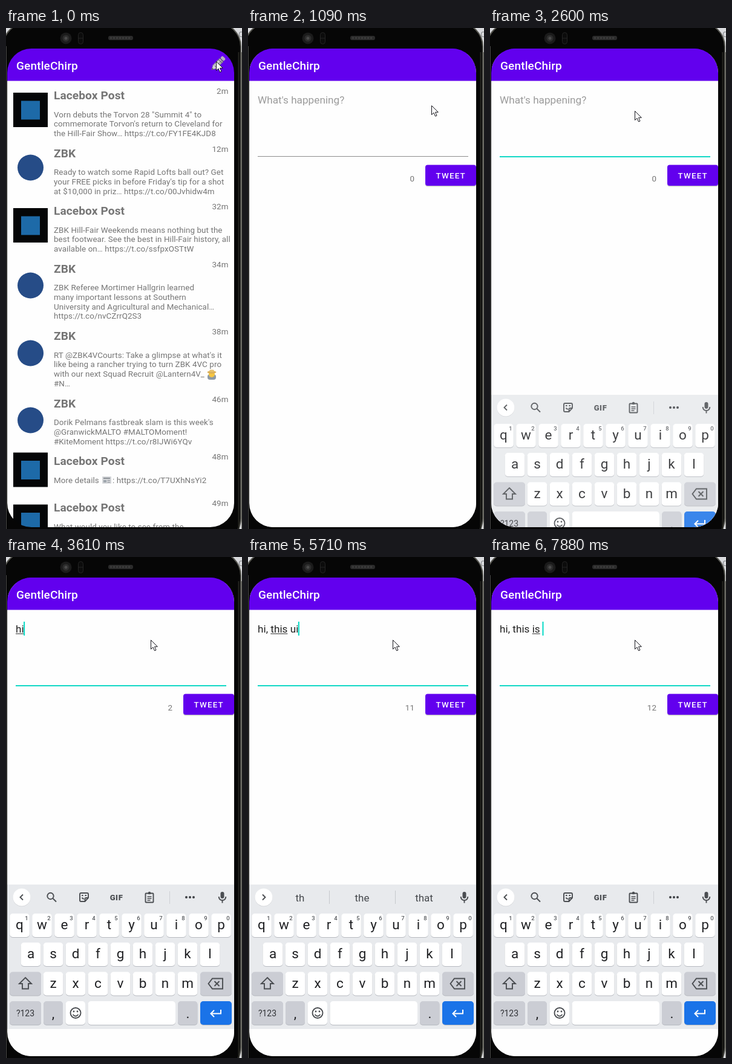
Recreate the animation shown at these times as an HTML page. Size 390 px wide and 829 px high, loop 8000 ms.

```html
<!DOCTYPE html>
<html lang="en">
<head>
<meta charset="utf-8">
<title>Phone post composer</title>
<style>
html, body { margin: 0; width: 100%; height: 100%; overflow: hidden; background: #000; }
svg { display: block; width: 390px; height: 829px; font-family: Roboto, Arial, sans-serif; }
text { white-space: pre; }
.mid { text-anchor: middle; }
.end { text-anchor: end; }
.title { font-size: 19.1px; font-weight: 500; fill: #fff; letter-spacing: .1px; }
.name { font-size: 19.1px; font-weight: 700; fill: #757575; letter-spacing: .1px; }
.body { font-size: 13.4px; fill: #757575; letter-spacing: .08px; }
.entry { font-size: 17.2px; }
.key { font-size: 22.5px; fill: #202124; text-anchor: middle; }
.hintnum { font-size: 9.5px; font-weight: 500; fill: #55585c; text-anchor: middle; }
.word { font-size: 17px; fill: #45484c; text-anchor: middle; }
.line { fill: none; stroke: #4b4e52; stroke-width: 1.9; }

#feed, #compose, #keys, #mouse, #focus { animation: 8s step-end infinite; }
#feed, #compose { transform-origin: 189.5px 430px; }
#feed { animation-name: feed; }
#compose { animation-name: compose; }
#keys { animation-name: keys; }
#mouse { animation-name: mouse; }
#focus { animation-name: focus; }
@keyframes feed {
  0% { transform: scale(1); }
  10% { transform: scale(1.006); }
  11.875%, 100% { transform: scale(1.13); }
}
@keyframes compose {
  0% { opacity: 0; transform: scale(.85); }
  11.875% { opacity: 1; transform: scale(.985); }
  13.625%, 100% { opacity: 1; transform: scale(1); }
}
@keyframes keys {
  0% { opacity: 0; transform: translateY(284px); }
  29.125% { opacity: .35; transform: translateY(225px); }
  30.75% { opacity: .65; transform: translateY(135px); }
  32.5% { opacity: .86; transform: translateY(65px); }
  34.875% { opacity: .97; transform: translateY(15px); }
  36.5%, 100% { opacity: 1; transform: translateY(0); }
}
@keyframes mouse {
  0% { transform: translate(347px, 55px); }
  8.5% { transform: translate(326px, 92px); }
  10% { transform: translate(300px, 129px); }
  11.875% { transform: translate(302px, 128px); }
  13.625% { transform: translate(303px, 128px); }
  15.25% { transform: translate(292px, 130px); }
  17.125% { transform: translate(268px, 134px); }
  18.75% { transform: translate(247px, 137px); }
  20.375%, 100% { transform: translate(239px, 137px); }
}
@keyframes focus {
  0% { opacity: 0; }
  21.875%, 100% { opacity: 1; }
}
</style>
</head>
<body>
<svg viewBox="0 0 390 829">
  <defs>
    <clipPath id="screen"><rect x="2" y="34" width="375" height="792" rx="40"/></clipPath>
    <g id="bar">
      <rect x="2" y="34" width="375" height="793" fill="#fefefe"/>
      <rect x="2" y="34" width="375" height="53.5" fill="#6200ee"/>
      <text class="title" x="17" y="68.5">GentleChirp</text>
    </g>
  </defs>

  <rect width="390" height="829" fill="#d9dadd"/>
  <text x="384" y="15" font-size="13" fill="#85878b">C</text>
  <rect x="-5" y="-9" width="393" height="860" rx="40" fill="#060606" stroke="#55554f" stroke-width="2"/>
  <path d="M384.5 40V829" stroke="#24241f" stroke-width="2"/>
  <path d="M389.5 40V829" stroke="#77776f"/>
  <path d="M.5 30V829" stroke="#4a4a48"/>
  <circle cx="99" cy="17" r="9.5" fill="#1b1b1b"/>
  <circle cx="99" cy="17" r="5.5" fill="#2d2d2d"/>
  <circle cx="99" cy="17" r="2.5" fill="#4a4a4a"/>
  <rect x="119.500" y="7.500" width="8" height="19" rx="4" fill="#0c0c0c" stroke="#242424"/>
  <path d="M120 17H127" stroke="#242424"/>
  <rect x="169" y="13" width="41" height="7" rx="3" fill="#2b2b2b"/>
  <path d="M172 16.500H207" stroke="#3c3c3c" stroke-width="3" stroke-dasharray="3 2"/>

  <g clip-path="url(#screen)">
    <g id="feed">
      <use href="#bar"/>
      <g transform="translate(350.500 58.500) rotate(-45)">
        <path d="M-15 0L-8 -4H-7V4H-8Z" fill="#d2cfd8" stroke="#77738a" stroke-width=".7"/>
        <rect x="-7" y="-4" width="15" height="8" fill="#aaa8b2" stroke="#77738a" stroke-width=".7"/>
        <path d="M-7 -1.500H8" stroke="#d8d6de" stroke-width="2"/>
        <path d="M5 -4V4M8 -4V4" stroke="#6a6578" stroke-width="1.300"/>
        <rect x="9" y="-4" width="5" height="8" rx="2" fill="#b5b2bc"/>
        <path d="M-15 0L-12 -1.700V1.700Z" fill="#555"/>
      </g>
      <g id="posts"></g>
    </g>

    <g id="compose">
      <use href="#bar"/>
      <path d="M16 212.500H364" stroke="#8c8c8c"/>
      <rect id="focus" x="16" y="212" width="348" height="2" fill="#12d8c6"/>
      <text id="hint" class="entry" x="16" y="125" fill="#9b9b9b">What's happening?</text>
      <text id="typed" class="entry" x="16" y="125" fill="#212121"></text>
      <rect id="mark" y="126.500" height="1" fill="#212121"/>
      <rect id="caret" y="107" width="2" height="23" fill="#03dac5"/>
      <text id="count" class="body end" x="275" y="253.500">0</text>
      <rect x="293" y="228" width="84" height="34.500" rx="4" fill="#ccc"/>
      <rect x="293" y="226.500" width="84" height="34.500" rx="4" fill="#6200ee"/>
      <text x="310.500" y="249" font-size="13.400" font-weight="500" letter-spacing="1.200" fill="#fff">TWEET</text>
    </g>

    <g id="keys">
      <rect x="2" y="542" width="375" height="239" fill="#e8eaed"/>
      <circle cx="26" cy="563.700" r="14.500" fill="#cfd1d4"/>
      <circle cx="26" cy="563" r="14.500" fill="#fff"/>
      <path id="chevron" class="line"/>
      <g id="tools">
        <g class="line">
          <circle cx="73.500" cy="561" r="5.200"/><path d="M77.500 565L83 570.500"/>
          <path d="M124 556H134Q136 556 136 558V564L130.500 570H124Q122 570 122 568V558Q122 556 124 556ZM136 564H132.500Q130.500 564 130.500 566V570M125.500 563.500Q127 566 129 565.500"/>
          <path d="M125 560H127.500M130.500 560H133"/>
          <rect x="230.500" y="556.500" width="13" height="15" rx="1"/>
          <path d="M234 556.500H240M233.500 562H240.500M233.500 565H240.500M233.500 568H238.500" stroke-width="1.500"/>
        </g>
        <circle cx="237" cy="556" r="2.200" fill="#4b4e52"/>
        <text class="mid" x="182.500" y="567.700" font-size="13" font-weight="900" letter-spacing=".6" fill="#4b4e52">GIF</text>
        <path d="M270.500 553V574" stroke="#cdd0d4"/>
        <g fill="#3f4246"><circle cx="298" cy="563" r="2"/><circle cx="304" cy="563" r="2"/><circle cx="310" cy="563" r="2"/></g>
      </g>
      <g id="words">
        <path d="M134.500 552V574M243.500 552V574" stroke="#c6c9cd"/>
        <text class="word" x="86" y="570"></text>
        <text class="word" x="188.500" y="570"></text>
        <text class="word" x="291" y="570"></text>
      </g>
      <rect x="354.500" y="554" width="6" height="11" rx="3" fill="#4b4e52"/>
      <path class="line" d="M351.700 562Q352 568 357.500 568Q363 568 363.300 562M357.500 568V572.500" stroke-width="1.700"/>
      <g id="caps"></g>
      <g class="line" stroke-width="2">
        <path d="M32 696L42 706H37V714.500H27V706H22Z"/>
        <path d="M341 697.500H358V714.500H341L334.500 706ZM344.500 702L352.500 710M352.500 702L344.500 710"/>
        <circle cx="115" cy="754.500" r="8.500"/>
        <path d="M110.500 757Q115 762.500 119.500 757"/>
      </g>
      <circle cx="112" cy="752" r="1.400" fill="#4b4e52"/>
      <circle cx="118" cy="752" r="1.400" fill="#4b4e52"/>
      <path d="M355 749V755.500H339M344 750L338.500 755.500L344 761" fill="none" stroke="#fff" stroke-width="2"/>
      <text class="mid" x="32" y="760" font-size="14" fill="#303236">?123</text>
      <text class="key" x="78" y="763">,</text>
      <text class="key" x="300.500" y="763">.</text>
    </g>
  </g>

  <path id="mouse" d="M.5 .5V15.500L4 12.200L6.500 18L9 17L6.600 11.300H11.300Z" fill="#fff" stroke="#15151c" stroke-width="1"/>
</svg>

<script>
const $ = id => document.getElementById(id);
const SHOP = "Lacebox Post", LEAGUE = "ZBK";

// name, name baseline, avatar centre, age, lines
const posts = [
  [SHOP, 118, 135.5, "2m", ['Vorn debuts the Torvon 28 "Summit 4" to', "commemorate Torvon's return to Cleveland for", "the Hill-Fair Show… https://t.co/FY1FE4KJD8"]],
  [LEAGUE, 213.5, 231, "12m", ["Ready to watch some Rapid Lofts ball out? Get", "your FREE picks in before Friday's tip for a shot", "at $10,000 in priz… https://t.co/00Jvhidw4m"]],
  [SHOP, 309, 326.5, "32m", ["ZBK Hill-Fair Weekends means nothing but the", "best footwear. See the best in Hill-Fair history, all", "available on… https://t.co/ssfpxOSTtW"]],
  [LEAGUE, 404.5, 426, "34m", ["ZBK Referee Mortimer Hallgrin learned", "many important lessons at Southern", "University and Agricultural and Mechanical…", "https://t.co/nvCZrrQ2S3"]],
  [LEAGUE, 516, 538, "38m", ["RT @ZBK4VCourts: Take a glimpse at what's it", "like being a rancher trying to turn ZBK 4VC pro", "with our next Squad Recruit @Lantern4V_", "#N…"]],
  [LEAGUE, 627.5, 649, "46m", ["Dorik Pelmans fastbreak slam is this week's", "@GranwickMALTO #MALTOMoment!", "#KiteMoment https://t.co/r8IJWi6YQv"]],
  [SHOP, 723, 731, "48m", ["More details"]],
  [SHOP, 800, 817, "49m", ["What would you like to see from the"]]
];

const text = (cls, x, y, s) => `<text class="${cls}" x="${x}" y="${y}">${s}</text>`;
const box = (x, y, w, h, fill, r = 0) => `<rect x="${x}" y="${y}" width="${w}" height="${h}" rx="${r}" fill="${fill}"/>`;

const avatar = (name, y) => name === SHOP
  ? box(12, y - 28.5, 57, 57, "#050607") + box(25, y - 15, 31, 31, "#1d6aa8")
  : `<circle cx="40.500" cy="${y}" r="21.500" fill="#264c87"/>`;

const farmer = box(333, 573, 14, 9, "#8e9aa5", 4) +
  '<circle cx="340" cy="573" r="5" fill="#f5c542"/><ellipse cx="340" cy="569.500" rx="7.500" ry="2.200" fill="#d9ad55"/>' +
  box(336, 565.5, 8, 4, "#e5bf6c", 2);
const paper = box(159, 742, 15, 12, "#d5d7da", 1) + box(161, 744, 11, 2, "#8b9096") +
  box(161, 748, 5, 4, "#9fa6ad") + box(167.5, 748, 4.5, 1, "#8b9096") + box(167.5, 751, 4.5, 1, "#8b9096");

$("posts").innerHTML = posts.map(([name, y, ay, age, lines]) =>
  avatar(name, ay) + text("name", 79, y, name) + text("body end", 367.5, y - 9, age) +
  lines.map((s, i) => text("body", 79, y + 29.7 + i * 15.75, s)).join("")
).join("") + farmer + paper + text("body", 176, 752.7, ": https://t.co/T7UXhNsYi2");

const cap = (x, y, w, fill = "#fff") => box(x, y + 1, w, 39, "#b7bac0", 5) + box(x, y, w, 39, fill, 5);
const GREY = "#cbcdd4";
const rows = [["qwertyuiop", 22.5, 590], ["asdfghjkl", 41, 638], ["zxcvbnm", 78, 686.5]];
$("caps").innerHTML = rows.map(([chars, x0, y], r) => [...chars].map((c, i) => {
  const x = x0 + i * 37;
  return cap(x - 16.3, y, 32.6) + text("key", x, y + 26, c) +
    (r ? "" : text("hintnum", x + 11.5, y + 10.5, (i + 1) % 10));
}).join("")).join("") +
  cap(6, 686.5, 52, GREY) + cap(321, 686.5, 52, GREY) + cap(6, 735, 52, GREY) + cap(62, 735, 32, GREY) +
  cap(98.5, 735, 32.5) + cap(135.5, 735, 144.5) + cap(284, 735, 32.5, GREY) + cap(321, 735, 52, "#1a73e8");

// time, entry, underlined part (start, end), suggestions, caret
const A = "hi his him", B = "th the that", C = "in is it";
const steps = [
  [0, "", 0, 0, "", 0],
  [1750, "", 0, 0, "", 1],
  [2330, "", 0, 0, "", 0],
  [2920, "", 0, 0, "", 1],
  [3610, "hi", 0, 2, "", 1],
  [3760, "hi", 0, 2, A, 1],
  [4060, "hi,", 0, 0, A, 1],
  [4210, "hi, ", 0, 0, A, 1],
  [4360, "hi, t", 4, 5, A, 1],
  [4510, "hi, th", 4, 6, A, 1],
  [4660, "hi, th", 4, 6, B, 1],
  [4810, "hi, thi", 4, 7, B, 1],
  [4960, "hi, this", 4, 7, B, 1],
  [5100, "hi, this", 4, 8, B, 1],
  [5260, "hi, this ", 4, 8, B, 1],
  [5560, "hi, this u", 4, 8, B, 1],
  [5710, "hi, this ui", 4, 8, B, 1],
  [5850, "hi, this ui", 9, 11, B, 1],
  [5980, "hi, this u", 9, 10, B, 1],
  [6260, "hi, this ", 0, 0, B, 1],
  [6400, "hi, this ", 0, 0, "", 1],
  [6560, "hi, this i", 9, 10, "", 1],
  [6720, "hi, this is", 9, 11, "", 1],
  [6880, "hi, this is", 9, 11, C, 1],
  [7350, "hi, this is ", 9, 11, C, 1],
  [7740, "hi, this is ", 9, 11, "", 1]
];

const pen = document.createElement("canvas").getContext("2d");
const width = s => {
  pen.font = "17.2px Roboto, Arial, sans-serif";
  return pen.measureText(s).width;
};
const show = (el, on) => { el.style.display = on ? "" : "none"; };

function draw([, entry, from, to, bar, caret]) {
  $("typed").textContent = entry;
  $("count").textContent = entry.length;
  show($("hint"), !entry);
  show($("caret"), caret);
  $("caret").setAttribute("x", 15.5 + width(entry));
  const x = width(entry.slice(0, from));
  $("mark").setAttribute("x", 16 + x);
  $("mark").setAttribute("width", width(entry.slice(0, to)) - x);
  show($("tools"), !bar);
  show($("words"), bar);
  const words = bar.split(" ");
  document.querySelectorAll(".word").forEach((el, i) => { el.textContent = words[i] || ""; });
  $("chevron").setAttribute("d", bar ? "M24 558.500L28.500 563L24 567.500" : "M28 558.500L23.500 563L28 567.500");
}

let start, last;
function tick(now) {
  start ??= now;
  const t = (now - start) % 8000;
  const step = steps.findLast(s => s[0] <= t) || steps[0];
  if (step !== last) draw(last = step);
  requestAnimationFrame(tick);
}
draw(steps[0]);
requestAnimationFrame(tick);
</script>
</body>
</html>
```
